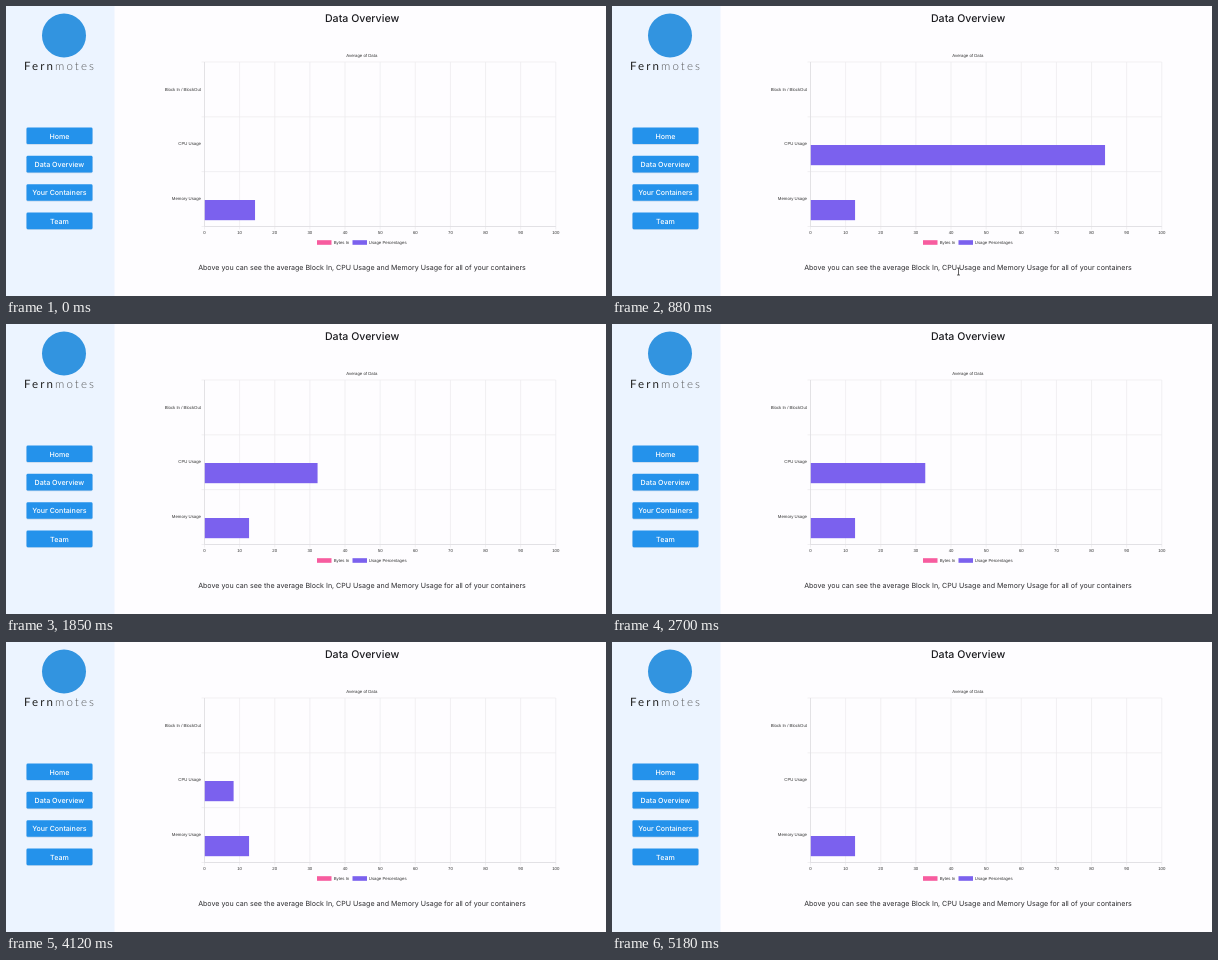
Write an HTML page that moves like this. It is 600x290 px and loops after 5270 ms.

```html
<!DOCTYPE html>
<html lang="en">
<head>
<meta charset="utf-8">
<title>Data Overview</title>
<style>
  html, body { margin: 0; width: 100%; height: 100%; overflow: hidden; background: #fefdff; }
  svg { display: block; width: 600px; height: 290px; }
  text { font-family: Inter, sans-serif; fill: #2b2b2e; text-rendering: geometricPrecision; }
  .mid { text-anchor: middle; }
  .end { text-anchor: end; }
  .heading { font-size: 10.6px; font-weight: 500; fill: #1c1c20; }
  .caption { font-size: 7.09px; }
  .button { font-size: 7.09px; font-weight: 500; fill: #fff; }
  .chart text { font: 4.3px "Liberation Sans", Arial, sans-serif; fill: #333; }
  .brand { font: 11.5px Lato, sans-serif; letter-spacing: 2.1px; fill: #222; }
  .brand tspan { font-weight: 300; fill: #555; }
</style>
</head>
<body>
<svg viewBox="0 0 600 290">
  <rect width="108.5" height="290" fill="#ecf4ff"/>
  <circle cx="58" cy="29.5" r="22" fill="#3294e0"/>
  <text class="brand" x="18" y="63.6">Fern<tspan>motes</tspan></text>
  <g id="menu"></g>
  <text class="heading mid" x="356.1" y="16.3">Data Overview</text>
  <g class="chart">
    <text class="mid" x="355.8" y="50.9">Average of Data</text>
    <g id="grid"></g>
    <g fill="#7b61ee">
      <rect id="cpu" x="198.8" y="139" height="20.2"/>
      <rect id="memory" x="198.8" y="194" height="20.2"/>
      <rect x="346.5" y="234.2" width="14.5" height="4.6"/>
    </g>
    <rect x="311" y="234.2" width="14.5" height="4.6" fill="#f75c9f"/>
    <text x="327.7" y="238">Bytes In</text>
    <text x="362.8" y="238">Usage Percentages</text>
  </g>
  <text class="caption mid" x="356" y="264">Above you can see the average Block In, CPU Usage and Memory Usage for all of your containers</text>
  <path id="cursor" d="M-1.5-3.5H1.5M0-3.5V3.5M-1.5 3.5H1.5" fill="none" stroke="#222" stroke-width=".7"/>
</svg>
<script>
const LOOP = 5270, EASE_MS = 1000;
const LEFT = 198.5, TOP = 56, BOTTOM = 220.5, UNIT = 3.513;
const $ = id => document.getElementById(id);

$('menu').innerHTML = ['Home', 'Data Overview', 'Your Containers', 'Team'].map((label, i) => {
  const y = 121.5 + i * 28.35;
  return `<rect x="20.5" y="${y + .7}" width="66" height="16.6" rx="1.3" fill="#c3d6ea"/>
    <rect x="20.5" y="${y}" width="66" height="16.6" rx="1.3" fill="#2492eb"/>
    <text class="button mid" x="53.4" y="${y + 11}">${label}</text>`;
}).join('');

const line = (x1, y1, x2, y2, color = '#ebeaed') =>
  `<path d="M${x1} ${y1}L${x2} ${y2}" stroke="${color}" stroke-width=".7"/>`;
const rowHeight = (BOTTOM - TOP) / 3;
let grid = '';
for (let i = 0; i <= 10; i++) {
  const x = LEFT + i * 10 * UNIT;
  grid += line(x, TOP, x, BOTTOM + 3) + `<text class="mid" x="${x}" y="228.3">${i * 10}</text>`;
}
for (let i = 0; i <= 3; i++) {
  const y = TOP + i * rowHeight;
  grid += line(LEFT - 3, y, LEFT + 100 * UNIT, y);
}
['Block In / BlockOut', 'CPU Usage', 'Memory Usage'].forEach((label, i) => {
  grid += `<text class="end" x="195" y="${TOP + (i + .5) * rowHeight + 1.2}">${label}</text>`;
});
grid += line(LEFT, TOP, LEFT, BOTTOM, '#dddce0') + line(LEFT, BOTTOM, LEFT + 100 * UNIT, BOTTOM, '#dddce0');
$('grid').innerHTML = grid;

// Each poll: start time and the value the bar eases towards.
const cpuPolls = [[30, 83.8], [1060, 32], [2110, 32.6], [3165, 8.2], [4215, 0]];
const memoryPolls = [[30, 12.6]];

function valueAt(t, value, polls) {
  for (const [start, goal] of polls) {
    const p = Math.min(1, Math.max(0, (t - start) / EASE_MS));
    value += (goal - value) * (1 - (1 - p) ** 4);
  }
  return value;
}

function draw(now) {
  const t = now % LOOP;
  $('cpu').setAttribute('width', valueAt(t, 0, cpuPolls) * UNIT);
  $('memory').setAttribute('width', valueAt(t, 14.3, memoryPolls) * UNIT);
  const rest = 1 - Math.min(1, Math.max(0, (t - 150) / 250));
  $('cursor').setAttribute('transform', `translate(346.5 ${265.5 + 28 * rest * rest})`);
  $('cursor').setAttribute('visibility', t > 150 && t < 900 ? 'visible' : 'hidden');
  requestAnimationFrame(draw);
}
draw(0);
</script>
</body>
</html>
```
